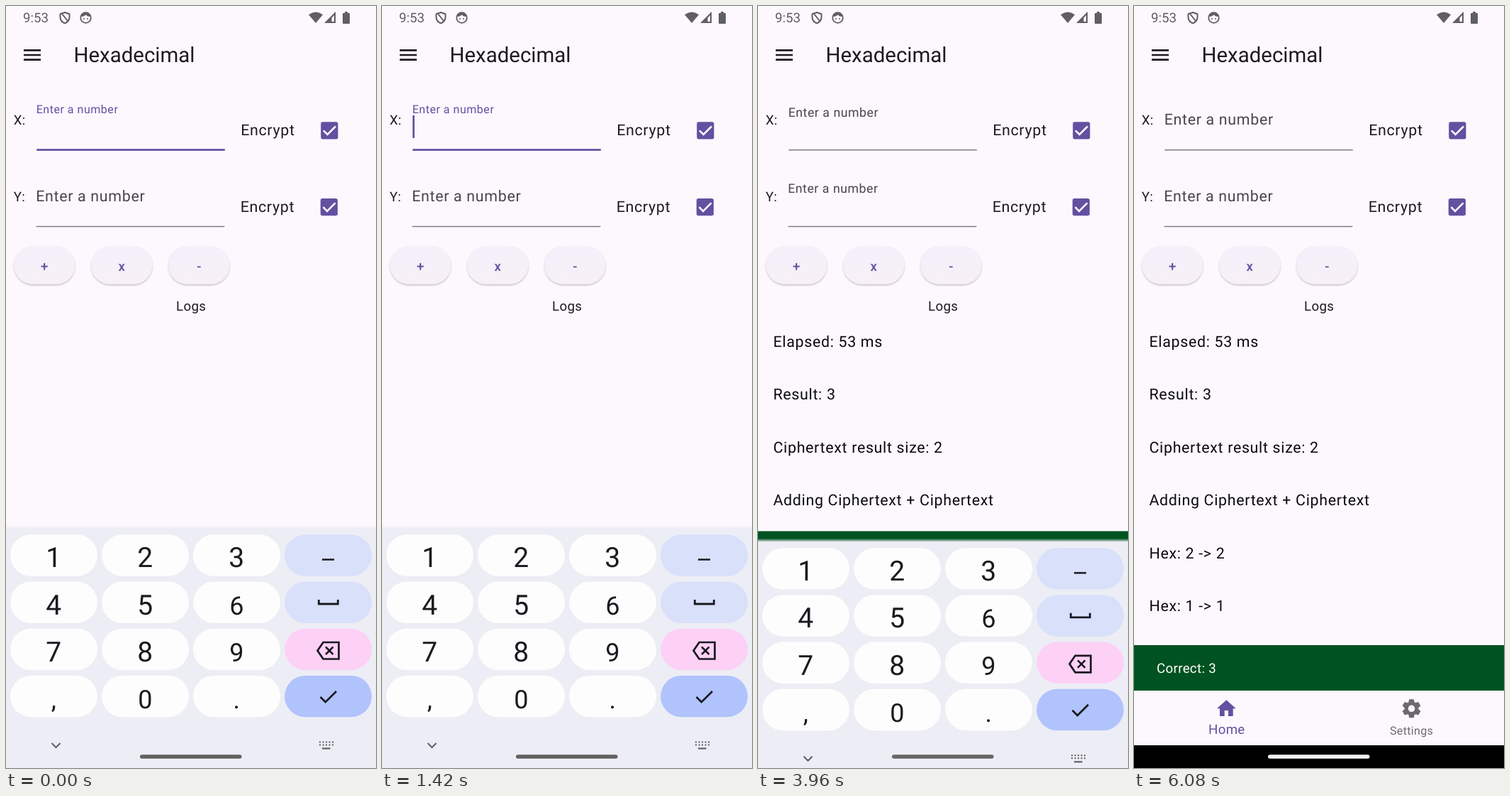
An HTML page for the animation above (6.12 s loop, 522x1073 px).

```html
<!DOCTYPE html>
<html lang="en">
<head>
<meta charset="utf-8">
<title>Hexadecimal calculator</title>
<style>
  html, body { margin: 0; width: 100%; height: 100%; overflow: hidden; background: #fcf8fe; }
  svg { display: block; width: 522px; height: 1073px; }
  text { font-family: Roboto, sans-serif; fill: #1c1b20; text-rendering: geometricPrecision; white-space: pre; }
  .lg { font-size: 21.4px; letter-spacing: .67px; }
  .md { font-size: 18.7px; letter-spacing: .33px; }
  .sm { font-size: 16.05px; letter-spacing: .33px; }
  .op { font-size: 18.7px; font-weight: 500; fill: #6350a0; text-anchor: middle; }
  .num { font-size: 39px; fill: #19191f; text-anchor: middle; }
  .mid { text-anchor: middle; }
</style>
</head>
<body>
<svg id="stage" viewBox="0 0 522 1073">
  <defs>
    <linearGradient id="tint" x1="0" y1="0" x2=".25" y2="1">
      <stop offset="0" stop-color="#f3f0fb"/><stop offset="1" stop-color="#f7f0f6"/>
    </linearGradient>
    <linearGradient id="edge" x1="0" y1="0" x2="0" y2="1">
      <stop offset="0" stop-color="#ededf5" stop-opacity="0"/><stop offset="1" stop-color="#ededf5"/>
    </linearGradient>
    <filter id="lift" x="-20%" y="-20%" width="140%" height="150%">
      <feDropShadow dx="0" dy="1.3" stdDeviation="1" flood-color="#000" flood-opacity=".28"/>
    </filter>
  </defs>
  <rect width="522" height="1073" fill="#fcf8fe"/>

  <g id="status" fill="#5f5e64">
    <text class="md" x="24" y="23" style="fill:#5f5e64;letter-spacing:0">9:53</text>
    <path d="M83 9 L89.5 11.3 V16 C89.5 20 86.5 23 83 24.3 C79.5 23 76.5 20 76.5 16 V11.3 Z M79 11 L87 21" fill="none" stroke="#5f5e64" stroke-width="2"/>
    <circle cx="112.500" cy="16.500" r="7.300" fill="none" stroke="#5f5e64" stroke-width="1.800"/>
    <path d="M105.500 15 A7.300 7.300 0 0 1 119.500 15 Q115 15 112.500 12.500 Q110 15 105.500 15 Z"/>
    <circle cx="110" cy="18" r="1"/><circle cx="115" cy="18" r="1"/>
    <path d="M427 12.200 Q437 5 447 12.200 L437 24 Z"/>
    <path d="M465 8 V24 H449 Z M463 13 V22 H459.500 V16.500 Z" fill-rule="evenodd"/>
    <path d="M478 8 H482 V10 H484 Q485 10 485 11 V24 Q485 25 484 25 H476 Q475 25 475 24 V11 Q475 10 476 10 H478 Z"/>
  </g>

  <path d="M25 62.300 H49 M25 69 H49 M25 75.700 H49" stroke="#1c1b20" stroke-width="2.700"/>
  <text x="95.500" y="78.500" font-size="29.440">Hexadecimal</text>

  <g id="rows"></g>
  <g id="tools"></g>
  <g id="logs"></g>

  <g id="snack">
    <rect id="snackBox" width="522" height="64" fill="#005321"/>
    <text id="snackText" class="md" x="32" style="fill:#fff">Correct: 3</text>
  </g>
  <g id="nav">
    <rect y="964" width="522" height="78" fill="#fcf8fe"/>
    <path transform="translate(114.300 973.300) scale(1.338)" d="M10 20v-6h4v6h5v-8h3L12 3 2 12h3v8z" fill="#6350a0"/>
    <text class="md" x="105" y="1025" style="fill:#6350a0">Home</text>
    <g id="gear" transform="translate(391.500 989.300)" fill="#6c6970"></g>
    <text class="sm" x="361" y="1026" style="fill:#6c6970">Settings</text>
    <rect y="1041" width="522" height="32" fill="#000"/>
  </g>
  <g id="keys"></g>
  <rect id="pill" x="189" y="1054.200" width="143.500" height="5.600" rx="2.800"/>
</svg>
<script>
const LOOP = 6120, TYPE_X = 1700, FOCUS_Y = 2540, TYPE_Y = 2840, DONE = 3900;
const PURPLE = '#6350a0';
const NS = 'http://www.w3.org/2000/svg';
const $ = id => document.getElementById(id);

function add(parent, tag, attrs = {}, text) {
  const el = document.createElementNS(NS, tag);
  for (const k in attrs) el.setAttribute(k, attrs[k]);
  if (text !== undefined) el.textContent = text;
  parent.appendChild(el);
  return el;
}
const show = (el, on) => el.setAttribute('visibility', on ? 'visible' : 'hidden');
const move = (el, y) => el.setAttribute('transform', `translate(0 ${y})`);
const part = (t, from, len) => Math.min(1, Math.max(0, (t - from) / len));
const ease = p => p * p * (3 - 2 * p);
const within = (t, spans) => spans.some(([a, b]) => t >= a && t < b);

// Each row is laid out around the top of its empty state.
function makeRow(name, top, digit) {
  const g = add($('rows'), 'g');
  const x = name === 'X' ? 43.2 : 42.7;
  add(g, 'text', { class: 'md', x: 10.8, y: 167 }, name + ':');
  const label = add(g, 'text', { class: 'lg' }, 'Enter a number');
  const value = add(g, 'text', { class: 'lg', x: x - .3, y: 180.7 }, digit);
  const caret = add(g, 'rect', { y: 154, width: 2.7, height: 32, fill: PURPLE });
  const line = add(g, 'rect', { x, width: 265.6 });
  const count = add(g, 'text', { class: 'md mid', x: 412.3, y: 128.7 }, digit);
  add(g, 'text', { class: 'lg', x: x + 288, y: 182.3 }, 'Encrypt');
  add(g, 'rect', { x: x + 401, y: 163.2, width: 24.2, height: 24.2, rx: 2.7, fill: PURPLE });
  add(g, 'path', { d: `M${x + 404.700} 175.400 l5.600 5.600 l11.500 -11.500`, fill: 'none', stroke: '#fff', 'stroke-width': 2.6 });

  return ({ float, focus, filled, blink, shift }) => {
    move(g, top + shift);
    const size = 1 - .25 * float;
    label.setAttribute('transform', `translate(${x - .5} ${167 - 16.4 * float}) scale(${size})`);
    label.style.fill = focus ? PURPLE : '#49454f';
    show(value, filled);
    show(count, filled);
    show(caret, blink);
    caret.setAttribute('x', x + (filled ? 12.6 : 0));
    line.setAttribute('y', focus ? 201.2 : 202);
    line.setAttribute('height', focus ? 2.7 : 1.4);
    line.setAttribute('fill', focus ? PURPLE : '#79747e');
  };
}
const rowX = makeRow('X', 0, '1');
const rowY = makeRow('Y', 107.8, '2');

['+', 'x', '-'].forEach((sign, i) => {
  const cx = 54.3 + 109 * i;
  add($('tools'), 'rect', { x: cx - 43, y: 338.3, width: 86, height: 53.5, rx: 26.75, fill: 'url(#tint)', filter: 'url(#lift)' });
  add($('tools'), 'text', { class: 'op', x: cx, y: 372.5 }, sign);
});
add($('tools'), 'text', { class: 'md', x: 240, y: 429.3 }, 'Logs');

['Elapsed: 53 ms', 'Result: 3', 'Ciphertext result size: 2', 'Adding Ciphertext + Ciphertext', 'Hex: 2 -> 2', 'Hex: 1 -> 1']
  .forEach((s, i) => add($('logs'), 'text', { class: 'lg', x: 21.5, y: 480 + 74.4 * i, style: 'fill:#0c0b0f' }, s));

add($('gear'), 'circle', { r: 7.3, fill: 'none', stroke: '#6c6970', 'stroke-width': 5 });
for (let a = 0; a < 360; a += 60)
  add($('gear'), 'path', { d: 'M-4.600 -7 L-3.200 -13 H3.200 L4.600 -7 Z', transform: `rotate(${a})` });

const keys = $('keys');
add(keys, 'rect', { y: 731, width: 522, height: 5, fill: 'url(#edge)' });
add(keys, 'rect', { y: 735.5, width: 522, height: 338, fill: '#ededf5' });
const sideFill = ['#d9e0fa', '#d9e0fa', '#fcd1f5', '#b0c3fc'];
['123', '456', '789', ',0.'].forEach((chars, r) => {
  const y = 744.3 + 66.2 * r;
  for (let c = 0; c < 4; c++)
    add(keys, 'rect', { x: 6 + 129 * c, y, width: 123, height: 58.4, rx: 29.2, fill: c < 3 ? '#fdfdfd' : sideFill[r] });
  [...chars].forEach((ch, c) => {
    const small = '690,.'.includes(ch);
    add(keys, 'text', { class: 'num', x: 67.3 + 129 * c, y: y + 46, style: small ? 'font-size:36px' : '' }, ch);
  });
});
const icon = (d, w, color = '#19191f') => add(keys, 'path', { d, fill: 'none', stroke: color, 'stroke-width': w });
icon('M446 779.500 H463', 2.5);
icon('M441.300 836 V842 H468.300 V836', 2.8);
icon('M447.500 896 H469.500 V919.500 H447.500 L439.500 907.700 Z', 2.7);
icon('M451 902.500 L461.500 913 M461.500 902.500 L451 913', 2.5);
icon('M443.500 973 L450.700 980.200 L466 965', 2.7);
icon('M64.500 1038 L70.500 1044 L76.500 1038', 2, '#5f5e64');
for (const y of [1036.5, 1040.5])
  add(keys, 'path', { d: `M442 ${y} H462`, stroke: '#5f5e64', 'stroke-width': 2, 'stroke-dasharray': '2 2.500' });
icon('M446 1045.500 H457.500', 2.2, '#5f5e64');

function draw(t) {
  const done = t >= DONE;
  const hasX = t >= TYPE_X && !done, hasY = t >= TYPE_Y && !done;
  const onY = t >= FOCUS_Y && !done;
  const fall = 1 - ease(part(t, DONE, 167));

  rowX({
    float: done ? fall : 1, focus: t < FOCUS_Y, filled: hasX, shift: hasX ? -1 : 0,
    blink: within(t, [[200, 700], [1200, 2200]])
  });
  rowY({
    float: done ? fall : ease(part(t, FOCUS_Y, 167)), focus: onY, filled: hasY,
    shift: hasY ? -2.6 : hasX ? -1.4 : 0,
    blink: within(t, [[FOCUS_Y, TYPE_Y + 500], [TYPE_Y + 1000, DONE]])
  });
  move($('tools'), hasY ? -2.4 : hasX ? -1.3 : 0);
  show($('logs'), done);

  const p = part(t, DONE, 260), drop = 342 * p * p;
  move(keys, drop);
  show(keys, p < 1);

  const grow = 1 - (1 - part(t, DONE + 40, 250)) ** 3;
  const top = Math.min(964, 735.5 + drop) - 64 * grow;
  show($('snack'), grow > 0);
  $('snackBox').setAttribute('y', top);
  $('snackBox').setAttribute('height', 64 * grow);
  $('snackText').setAttribute('y', top + 38.5);
  $('snackText').setAttribute('opacity', part(grow, .6, .4));

  const gray = Math.round(96 + 24 * p + 122 * ease(part(t, 4430, 300)));
  $('pill').setAttribute('fill', `rgb(${gray},${gray},${gray})`);
}

const start = performance.now();
function tick() {
  draw((performance.now() - start) % LOOP);
  requestAnimationFrame(tick);
}
tick();
</script>
</body>
</html>
```
